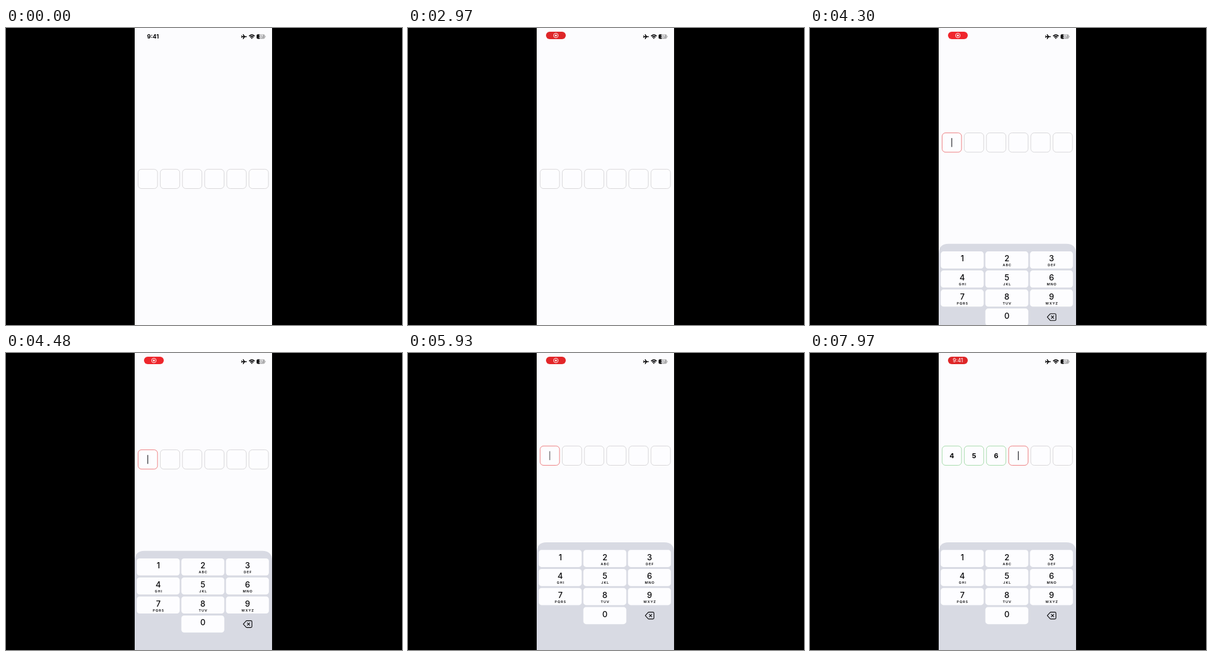
Animation of 640x480 px, one loop 7.99 s. Source, as an HTML page:

```html
<!DOCTYPE html>
<html lang="en">
<head>
<meta charset="utf-8">
<title>Passcode entry</title>
<style>
  html, body { margin: 0; width: 100%; height: 100%; overflow: hidden; background: #000; }
  svg { display: block; width: 100vw; height: 100vh; }
  text { font-family: Inter, Roboto, sans-serif; text-anchor: middle; fill: #08080a; }
  .box rect { fill: #fdfdff; stroke: #d9d8da; }
  .box.active rect { stroke: #ee8284; }
  .box.filled rect { stroke: #a9dcae; }
  .box text { font-size: 11px; font-weight: 700; }
  .key { fill: #fdfdff; }
  .key.down { fill: #c6c9d4; }
  .digit { font-size: 13px; font-weight: 500; }
  .letters { font-size: 5.4px; font-weight: 600; letter-spacing: 1px; }
  .line { fill: none; stroke: #08080a; }
</style>
</head>
<body>
<svg viewBox="0 0 640 480">
  <rect x="208" width="222" height="480" fill="#fcfcfe"/>

  <text id="clock" x="237.5" y="17.3" font-size="9.2" font-weight="700">9:41</text>
  <g id="pill">
    <rect id="pillBody" x="-16" y="-6" width="32" height="12" rx="6"/>
    <g id="record">
      <circle r="3.7" fill="none" stroke="#ffeaea"/>
      <circle r="1.7" fill="#ffeaea"/>
    </g>
    <text id="pillTime" y="3.1" font-size="8.4" font-weight="500" style="fill:#fff0f0">9:41</text>
  </g>

  <path fill="#08080a" d="M389.4 14q0 .8-1.4.8h-2l-2.3 3.2h-1.1l1.1-3.2h-1.8l-.9 1.3h-.9l.6-2.1-.6-2.1h.9l.9 1.3h1.8l-1.1-3.2h1.1l2.3 3.2h2q1.4 0 1.4.8z"/>
  <g class="line" stroke-width="1.7">
    <path d="M392.9 13.1q4.4-4 8.8 0"/>
    <path d="M394.7 15q2.6-2.2 5.2 0"/>
  </g>
  <circle cx="397.3" cy="16.5" r="1.1" fill="#08080a"/>
  <rect x="405" y="10.3" width="13.4" height="7.2" rx="2.2" fill="#aeaeb0"/>
  <path fill="#08080a" d="M410 10.3v7.2h-2.8q-2.2 0-2.2-2.2v-2.8q0-2.2 2.2-2.2z"/>
  <path d="M419.1 12.8v2.2" stroke="#aeaeb0"/>
  <text x="411.7" y="16.2" font-size="6" font-weight="700" style="fill:#fdfdff">37</text>

  <g id="boxes">
    <rect id="caret" x="-.7" y="8.8" width="1.2" height="14.4" fill="#26262c"/>
  </g>

  <g id="keyboard">
    <path d="M208 180V16q0-16 16-16h190q16 0 16 16v164z" fill="#d8dae3"/>
    <g class="line" transform="translate(390.5 118.4)" stroke-width="1.1" stroke-linejoin="round">
      <path d="M-7 0l4.3-4.8q.6-.7 1.5-.7h6.4q1.8 0 1.8 1.8v7.4q0 1.8-1.8 1.8h-6.4q-.9 0-1.5-.7z"/>
      <path d="M-.8-2.3l4.6 4.6m0-4.6l-4.6 4.6"/>
    </g>
  </g>
</svg>
<script>
const LOOP = 7990;
const FOCUS = 3970;
const PILL_IN = 650;
const PILL_SWAP = 6650;
const PRESS_TIME = 130;
const TYPE_DELAY = 60;
const presses = [
  { digit: 4, at: 6200 },
  { digit: 5, at: 6750 },
  { digit: 6, at: 7390 }
];

const $ = id => document.getElementById(id);
const clamp = v => Math.max(0, Math.min(1, v));
const ramp = (t, from, length) => clamp((t - from) / length);
const mix = (a, b, p) => a + (b - a) * p;

function add(parent, tag, attrs, content = '') {
  const el = document.createElementNS('http://www.w3.org/2000/svg', tag);
  for (const name in attrs) el.setAttribute(name, attrs[name]);
  el.textContent = content;
  return parent.appendChild(el);
}

const boxX = i => 229.2 + i * 35.85;
const boxes = Array.from({ length: 6 }, (_, i) => {
  const group = add($('boxes'), 'g', { class: 'box', transform: `translate(${boxX(i)} 0)` });
  add(group, 'rect', { x: -15.7, y: .4, width: 31.4, height: 31.2, rx: 5.5 });
  return { group, label: add(group, 'text', { y: 20.2 }) };
});
$('boxes').append($('caret'));

const letters = ['', 'ABC', 'DEF', 'GHI', 'JKL', 'MNO', 'PQRS', 'TUV', 'WXYZ'];
const keys = {};
function addKey(digit, column, row) {
  const x = 211.3 + column * 72.1, y = 12.3 + row * 30.75, middle = x + 34.8;
  keys[digit] = add($('keyboard'), 'rect', { class: 'key', x, y, width: 69.4, height: 27.6, rx: 4.5 });
  add($('keyboard'), 'text', { class: 'digit', x: middle, y: y + 16.2 }, digit);
  add($('keyboard'), 'text', { class: 'letters', x: middle + .6, y: y + 24.2 }, letters[digit - 1]);
}
for (let n = 0; n < 9; n++) addKey(n + 1, n % 3, Math.floor(n / 3));
addKey(0, 1, 3);

// Critically damped spring shared by the keyboard and the row of boxes.
function keyboardProgress(t) {
  const s = Math.max(0, t - FOCUS) * .0082;
  return 1 - (1 + s) * Math.exp(-s);
}

function caretOpacity(elapsed) {
  const phase = elapsed / 1000 % 1;
  return Math.max(1 - ramp(phase, .55, .13), ramp(phase, .85, .15));
}

function drawPill(t) {
  const s = Math.max(0, t - PILL_IN) / 1000;
  const scale = 1 - Math.exp(-8 * s) * Math.cos(10.5 * s);
  const glow = .5 - .5 * Math.cos((t - 2970) / 2500 * 2 * Math.PI);
  const swap = ramp(t, PILL_SWAP, 250);
  $('pill').setAttribute('transform', `translate(239 12.1) scale(${scale})`);
  $('pill').setAttribute('opacity', ramp(t, PILL_IN, 100));
  $('clock').setAttribute('opacity', 1 - ramp(t, PILL_IN - 50, 120));
  $('pillBody').setAttribute('fill', `rgb(${mix(222, 240, glow)} 38 ${mix(40, 44, glow)})`);
  $('record').setAttribute('opacity', 1 - swap);
  $('pillTime').setAttribute('opacity', swap);
}

function drawEntry(t) {
  const typed = presses.filter(p => t >= p.at + TYPE_DELAY);
  const focused = t >= FOCUS;
  boxes.forEach(({ group, label }, i) => {
    const filled = i < typed.length;
    group.classList.toggle('filled', filled);
    group.classList.toggle('active', focused && i === typed.length);
    label.textContent = filled ? typed[i].digit : '';
  });
  for (const { digit, at } of presses) {
    keys[digit].classList.toggle('down', t >= at && t < at + PRESS_TIME);
  }
  const since = typed.length ? typed[typed.length - 1].at + TYPE_DELAY : FOCUS;
  $('caret').setAttribute('transform', `translate(${boxX(typed.length)} 0)`);
  $('caret').setAttribute('opacity', focused ? caretOpacity(t - since) : 0);
}

function draw(t) {
  const p = keyboardProgress(t);
  $('boxes').setAttribute('transform', `translate(0 ${mix(227.9, 149.9, p)})`);
  $('keyboard').setAttribute('transform', `translate(0 ${mix(480, 306, p)})`);
  drawPill(t);
  drawEntry(t);
}

const start = performance.now();
function tick() {
  draw((performance.now() - start) % LOOP);
  requestAnimationFrame(tick);
}
tick();
</script>
</body>
</html>
```
